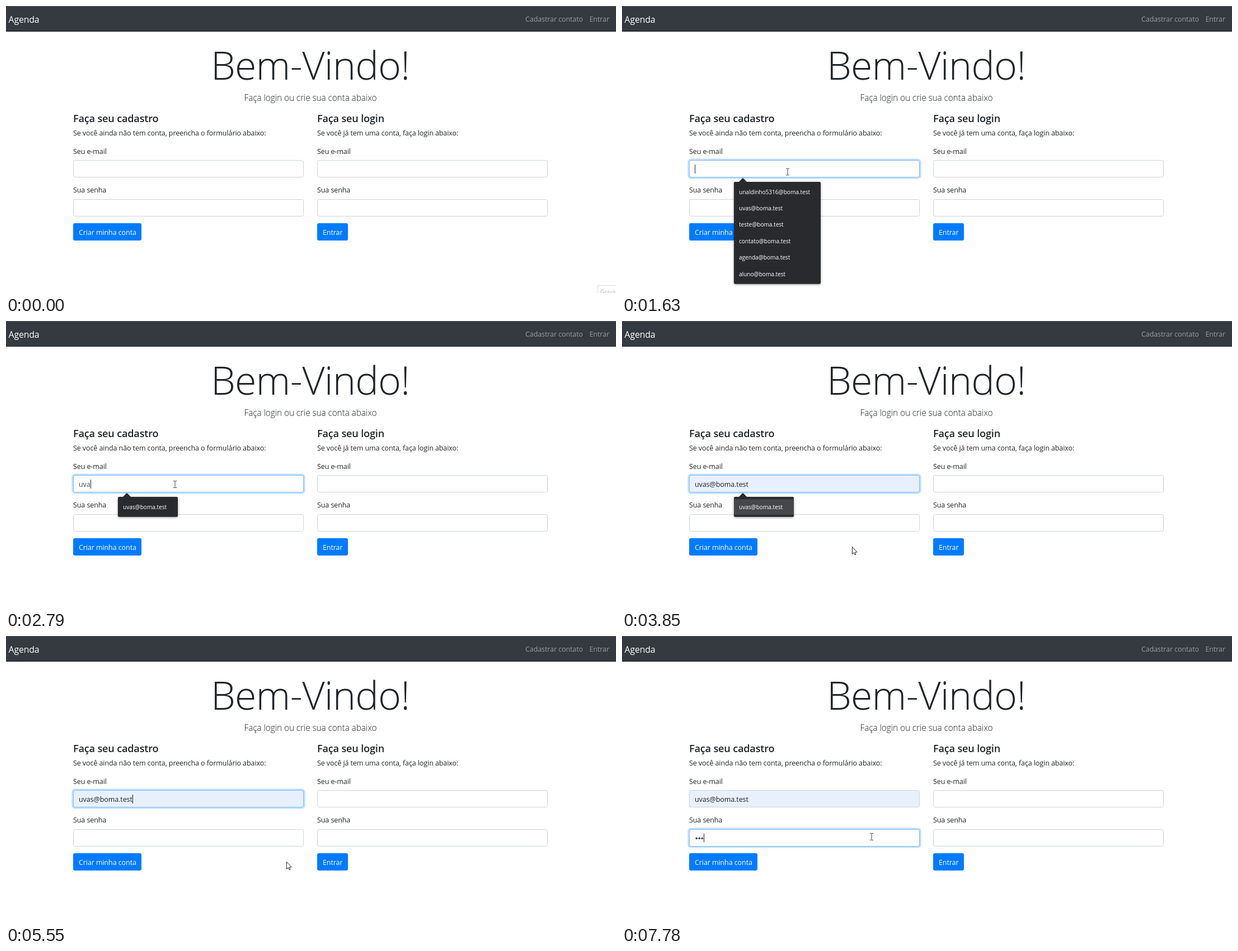
An HTML page that plays this animation: 1090 by 514 pixels, repeating every 8 s.

```html
<!DOCTYPE html>
<html lang="pt-BR">
<head>
<meta charset="utf-8">
<title>Agenda</title>
<style>
  html, body { margin: 0; width: 100%; height: 100%; overflow: hidden; background: #fff; }
  svg { display: block; width: 1090px; height: 514px; }
  text { font: 12.5px "Open Sans", "Noto Sans", sans-serif; letter-spacing: -.007em; fill: #212529; white-space: pre; }
  .brand { font-size: 15.8px; fill: #fff; }
  .nav { fill: #fff; fill-opacity: .5; }
  .hero { font-size: 70px; font-weight: 300; text-anchor: middle; letter-spacing: -.012em; }
  .lead { font-size: 15.5px; font-weight: 300; text-anchor: middle; letter-spacing: -.0095em; }
  .head { font-size: 18.1px; font-weight: 600; letter-spacing: -.0095em; }
  .white { fill: #fff; }
  .item { font-size: 10.2px; fill: #fff; }
  .hint { font-size: 10px; fill: #b9b9b9; }
  .shadow { filter: drop-shadow(0 1px 2px rgba(0, 0, 0, .4)); }
</style>
</head>
<body>
<svg id="stage" viewBox="0 0 1090 514"></svg>
<script>
const LOOP = 8000, BLINK = 530, FADE = 150;
const MAIL = "uvas@boma.test";
const ITEMS = ["unaldinho5316", "uvas", "teste", "contato", "agenda", "aluno"].map(n => n + "@boma.test");
const LEFT = 120, RIGHT = 556, FIELD_W = 412, FIELD_H = 31, MAIL_Y = 276, PASS_Y = 346;

// moments of the story, in ms
const CLICKS = [1310, 6450];
const [MAIL_FOCUS, PASS_FOCUS] = CLICKS.map(t => t + 20);
const OPEN = 1470, PREVIEW = 3850, PICK = 4310;
const MAIL_KEYS = [2360, 2580, 2790, 3350];
const PASS_KEYS = [7230, 7450, 7780];
const CARET_RESETS = [MAIL_FOCUS, ...MAIL_KEYS, PICK, PASS_FOCUS, ...PASS_KEYS];

// pointer moves: start, end, destination
const ORIGIN = { x: 1084, y: 510 };
const MOVES = [
  { from: 60, to: 810, x: 296, y: 297 },
  { from: 1630, to: 1680, x: 302, y: 292.5 },
  { from: 2909, to: 2910, x: 617, y: 308 },
  { from: 3350, to: 3520, x: 411, y: 404 },
  { from: 5140, to: 5550, x: 501, y: 404 },
  { from: 5810, to: 6400, x: 446, y: 359.5 }
];

const stage = document.getElementById("stage");

function add(tag, attrs, parent = stage) {
  const el = document.createElementNS("http://www.w3.org/2000/svg", tag);
  for (const k in attrs) el.setAttribute(k, attrs[k]);
  parent.appendChild(el);
  return el;
}
const rect = (x, y, width, height, fill, more = {}, parent) =>
  add("rect", { x, y, width, height, fill, ...more }, parent);
function label(x, y, str, cls = "", parent) {
  const el = add("text", { x, y, class: cls }, parent);
  el.textContent = str;
  return el;
}
const show = (el, v) => el.setAttribute("opacity", +v);
const clamp = v => Math.max(0, Math.min(1, v));
const ease = v => { const p = clamp(v); return p * p * (3 - 2 * p); };
const passed = (times, t) => times.filter(k => k <= t).length;

function field(x, y) {
  const frame = (grow, fill, stroke, width, alpha = 1) =>
    rect(x + .5 - grow, y + .5 - grow, FIELD_W - 1 + 2 * grow, FIELD_H - 1 + 2 * grow, fill,
      { rx: 3 + grow, stroke, "stroke-width": width, "stroke-opacity": alpha });
  const base = frame(0, "#fff", "#ced4da", 1);
  const glow = frame(1.8, "none", "#007bff", 2.6, .25);
  const edge = frame(0, "none", "#80bdff", 1);
  const focus = v => { show(glow, v); show(edge, v); };
  focus(0);
  return { base, focus };
}

function form(x, title, intro, action, width) {
  label(x, 208, title, "head");
  label(x, 232, intro);
  label(x, 265, "Seu e-mail");
  label(x, 334, "Sua senha");
  rect(x, 389, width, 31, "#007bff", { rx: 3.2 });
  label(x + 10, 410, action, "white");
  return [field(x, MAIL_Y), field(x, PASS_Y)];
}

// page
rect(0, 0, 1090, 46, "#343a40");
rect(0, 0, 1090, 1, "#50565c");
rect(0, 44, 1090, 2, "#2d3237");
label(4.5, 30, "Agenda", "brand");
label(928, 28, "Cadastrar contato", "nav");
label(1042.5, 28, "Entrar", "nav");
label(543.5, 132, "Bem-Vindo!", "hero");
label(544, 170, "Faça login ou crie sua conta abaixo", "lead");
const [mailField, passField] = form(LEFT, "Faça seu cadastro",
  "Se você ainda não tem conta, preencha o formulário abaixo:", "Criar minha conta", 122);
form(RIGHT, "Faça seu login", "Se você já tem uma conta, faça login abaixo:", "Entrar", 55);

const hint = add("g", {});
rect(1057.5, 500.5, 50, 30, "#fff", { stroke: "#dcdcd4" }, hint);
label(1062, 516, "Gravar", "hint", hint);

// field contents
const mail = label(130, 297, "");
const dots = PASS_KEYS.map((_, i) => add("circle", { cx: 133.3 + 5 * i, cy: 362.3, r: 1.9, fill: "#495057" }));
const caret = rect(130, 284, 1, 16, "#212529");

// suggestions
const popup = add("g", { class: "shadow" });
add("path", { d: "M208.5 315.5L216 308L223.5 315.5Z", fill: "#292a2d" }, popup);
const panel = rect(200, 315, 155, 65, "#292a2d", { rx: 2 }, popup);
const mark = rect(200, 319, 107, 28, "#46474a", {}, popup);
const rows = ITEMS.map((_, i) => label(209, 336.5 + 29.4 * i, "", "item", popup));

// pointer
const ring = add("circle", { r: 9.7, fill: "#ff0", "fill-opacity": .55 });
const arrow = add("path", {
  d: "M.4 .5V13.4L3.3 10.7L5.1 15L7 14.2L5.2 10H9.2Z",
  fill: "#fff", stroke: "#111", "stroke-width": .9
});
const beam = add("path", {
  d: "M-3 -6H-.8L0 -5.4L.8 -6H3M0 -5.4V5.4M-3 6H-.8L0 5.4L.8 6H3",
  fill: "none", stroke: "#333", "stroke-width": .9
});

function pointer(t) {
  let { x, y } = ORIGIN;
  for (const m of MOVES) {
    const p = ease((t - m.from) / (m.to - m.from));
    x += (m.x - x) * p;
    y += (m.y - y) * p;
  }
  return [x, y];
}

function overField(x, y) {
  const inX = [LEFT, RIGHT].some(l => x >= l && x <= l + FIELD_W);
  const inY = [MAIL_Y, PASS_Y].some(top => y >= top && y <= top + FIELD_H);
  return inX && inY;
}

function drawMail(t) {
  const filled = t >= PREVIEW;
  mail.textContent = filled ? MAIL : MAIL.slice(0, passed(MAIL_KEYS, t));
  mail.style.fill = filled ? "#212529" : "#495057";
  mailField.base.setAttribute("fill", filled ? "#e8f0fe" : "#fff");
  const swap = ease((t - PASS_FOCUS) / FADE);
  mailField.focus(ease((t - MAIL_FOCUS) / FADE) - swap);
  passField.focus(swap);
}

function drawCaret(t) {
  const onPass = t >= PASS_FOCUS, count = passed(PASS_KEYS, t);
  dots.forEach((d, i) => show(d, i < count));
  const typed = mail.textContent ? mail.getComputedTextLength() : 0;
  caret.setAttribute("x", Math.round(130 + (onPass ? 5.2 * count : typed)));
  caret.setAttribute("y", onPass ? 353.5 : 284);
  const reset = CARET_RESETS.filter(k => k <= t).pop();
  const lit = reset !== undefined && (t - reset) % (2 * BLINK) < BLINK;
  show(caret, lit && !(t >= PREVIEW && t < PICK));
}

// the list keeps the entries that begin with the typed text
function drawPopup(t) {
  const list = ITEMS.filter(s => s.startsWith(mail.textContent));
  show(popup, t >= OPEN ? 1 - clamp((t - PICK) / FADE) : 0);
  panel.setAttribute("width", list.length === 1 ? 107 : 155);
  panel.setAttribute("height", 6.4 + 29.4 * list.length);
  rows.forEach((row, i) => { row.textContent = list[i] || ""; });
  show(mark, t >= PREVIEW);
}

function drawPointer(t) {
  const [x, y] = pointer(t);
  const seen = t >= MOVES[0].from, text = overField(x, y);
  show(arrow, seen && !text);
  show(beam, seen && text);
  show(ring, CLICKS.some(c => t >= c && t < c + 115));
  const move = `translate(${x} ${y})`;
  arrow.setAttribute("transform", move);
  beam.setAttribute("transform", move);
  ring.setAttribute("transform", `translate(${x - 1.5} ${y - .8})`);
}

function draw(t) {
  show(hint, t < MOVES[0].from);
  drawMail(t);
  drawCaret(t);
  drawPopup(t);
  drawPointer(t);
}

const start = performance.now();
function tick() {
  draw((performance.now() - start) % LOOP);
  requestAnimationFrame(tick);
}
tick();
</script>
</body>
</html>
```
